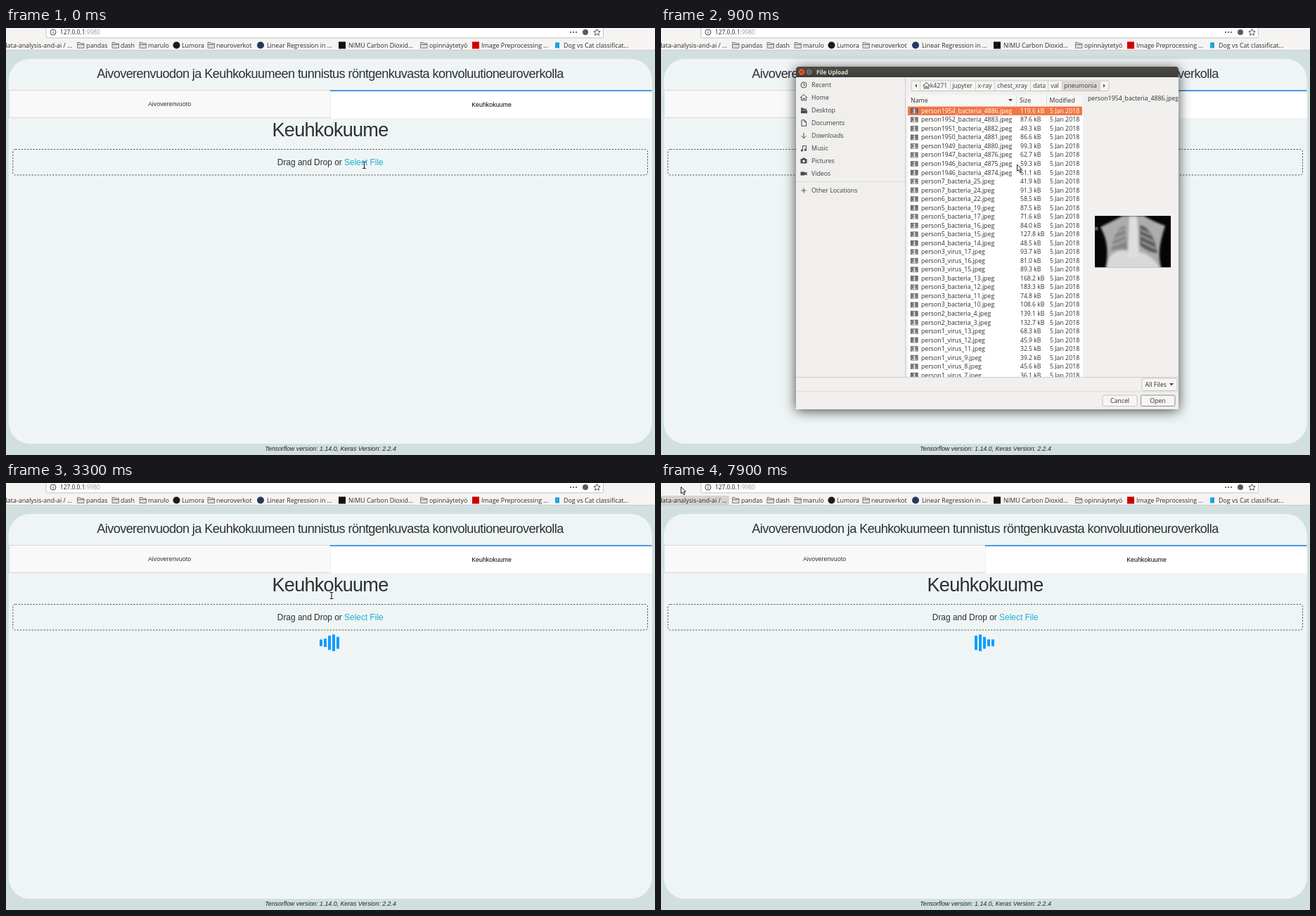
Recreate the animation shown at these times as an HTML page. Size 923 px wide and 607 px high, loop 8 s.

```html
<!DOCTYPE html>
<html lang="fi">
<head>
<meta charset="utf-8">
<title>Keuhkokuume</title>
<style>
html, body { margin: 0; width: 100%; height: 100%; overflow: hidden; background: #d1e0df; }
svg { display: block; width: 100vw; height: 100vh; }
text { font-family: "Open Sans", "Noto Sans", sans-serif; white-space: pre; }
.page text { font-family: "Liberation Sans", Arial, sans-serif; }
.mid { text-anchor: middle; }
.end { text-anchor: end; }
.line { fill: none; stroke: #4a4a4a; stroke-width: 1; }
.btn { fill: #f6f5f4; stroke: #bcb9b5; stroke-width: .8; }
.shadow { filter: drop-shadow(0 2px 9px rgba(0,0,0,.72)); }
</style>
</head>
<body>
<svg id="stage" viewBox="0 0 923 607"></svg>
<script>
const LOOP = 8000;
const INK = '#2e2e2e';
const rect = (x, y, w, h, fill, more = '') =>
  `<rect x="${x}" y="${y}" width="${w}" height="${h}" fill="${fill}" ${more}/>`;
const box = (x, y, w, h, cls, r = 2) =>
  `<rect class="${cls}" x="${x}" y="${y}" width="${w}" height="${h}" rx="${r}"/>`;
const disc = (x, y, r, fill) => `<circle cx="${x}" cy="${y}" r="${r}" fill="${fill}"/>`;
const path = (d, more = 'class="line"') => `<path d="${d}" ${more}/>`;
const text = (x, y, s, size = 8.8, fill = INK, more = '') =>
  `<text x="${x}" y="${y}" font-size="${size}" fill="${fill}" ${more}>${s}</text>`;
const mid = 'class="mid"';

// Browser bar
const folder = x => path(`M${x} 20.5h3.5l1 1.5h5v6.5h-9.5zM${x} 23.5h9.5`, 'fill="#dedcda" stroke="#77736f" stroke-width=".9"');
const marks = [[114, 'pandas'], [163, 'dash'], [202, 'marulo'], [250, 'Lumora'], [299, 'neuroverkot'],
  [371, 'Linear Regression in …'], [487, 'NIMU Carbon Dioxid…'], [602, 'opinnäytetyö'],
  [676, 'Image Preprocessing …'], [793, 'Dog vs Cat classificat…']];
const browser = rect(0, 0, 923, 32, '#f5f4f2') + rect(0, 31, 923, 1, '#cfccc9') +
  rect(57, -10, 792.5, 24, '#fff', 'rx="2.5" stroke="#c4c1be"') +
  `<circle class="line" cx="67" cy="6" r="4" stroke-width=".8"/>` + path('M67 5.5v2.8M67 3.6v1') +
  text(77, 9.2, '127.0.0.1<tspan fill="#999">:9980</tspan>', 8.4, '#222') +
  [803, 807, 811].map(x => disc(x, 6, 1.1, '#4a4a4a')).join('') + disc(824, 6, 4, '#5a5a5a') +
  path('M840.5 1.5l1.4 3 3.2.4-2.4 2.2.7 3.2-2.9-1.6-2.9 1.6.7-3.2-2.4-2.2 3.2-.4z') +
  rect(-4, 18, 101, 13, '#d6d3d0', 'id="hover" rx="2"') +
  text(94, 27.5, 'data-analysis-and-ai / …', 8.9, INK, 'class="end"') +
  [101.5, 151, 190, 287, 589.5].map(folder).join('') +
  marks.map(([x, s]) => text(x, 27.5, s, 8.9)).join('') +
  disc(242.5, 24.5, 5, '#1b1b1b') + disc(362, 24.5, 5, '#24385e') +
  rect(473, 19.5, 10, 10, '#111') + rect(663, 19.5, 10, 10, '#d00000') + rect(781, 20.5, 6, 8, '#1fa2dc');

// Web page
const page = `<g class="page">` + rect(3.8, 44, 915, 547, '#eff5f5', 'rx="30.2"') +
  text(461, 71, 'Aivoverenvuodon ja Keuhkokuumeen tunnistus röntgenkuvasta konvoluutioneuroverkolla', 18.15, '#2d3030', mid + ' letter-spacing="-.605"') +
  rect(4.5, 88.5, 457, 39, '#f9f9f9', 'stroke="#d3d5d5" stroke-width=".9"') +
  rect(461.5, 88.5, 457, 39.5, '#fff') + rect(461, 88.3, 457.5, 1.6, '#2380dc') +
  text(232.5, 111, 'Aivoverenvuoto', 8.9, '#333', mid) +
  text(690.5, 111.5, 'Keuhkokuume', 8.9, '#000', mid) +
  text(461, 153.5, 'Keuhkokuume', 27.1, '#2d3030', mid + ' letter-spacing="-.753"') +
  rect(9.8, 172.5, 902.7, 36.5, 'none', 'rx="3.5" stroke="#444" stroke-width=".9" stroke-dasharray="2.3 1.9"') +
  text(385.8, 195, 'Drag and Drop or <tspan id="link" fill="#1eaedb">Select File</tspan>', 11.92, '#2d3030') +
  text(461.5, 601, 'Tensorflow version: 1.14.0, Keras Version: 2.2.4', 8.8, '#222', mid + ' font-style="italic"') +
  `<g id="bars">` + [0, 1, 2, 3, 4].map(i => rect(446 + 6 * i, 215.2, 4, 24, '#119dff')).join('') + `</g></g>`;

// File dialog
const ROW = 12.53;
const rowY = i => 111.6 + ROW * i;
const files = ('1954b4886 119.6,1952b4883 87.6,1951b4882 49.3,1950b4881 86.6,1949b4880 99.3,1947b4876 62.7,' +
  '1946b4875 59.3,1946b4874 61.1,7b25 41.9,7b24 91.3,6b22 58.5,5b19 87.5,5b17 71.6,5b16 84.0,5b15 127.8,' +
  '4b14 48.5,3v17 93.7,3v16 81.0,3v15 89.3,3b13 168.2,3b12 183.3,3b11 74.8,3b10 108.6,2b4 139.1,2b3 132.7,' +
  '1v13 68.3,1v12 45.9,1v11 32.5,1v9 39.2,1v8 45.6,1v7 36.1').split(',').map(s => {
  const [id, size] = s.split(' ');
  return ['person' + id.replace('b', '_bacteria_').replace('v', '_virus_') + '.jpeg', size + ' kB'];
});
const thumb = i => {
  const y = rowY(i) + 2.5, g = 130 + i * 37 % 50;
  return rect(355, y, 10.5, 7.5, '#4a4a4a') + rect(356, y + 1, 8.5, 6.5, `rgb(${g},${g},${g})`) +
    rect(359.4, y + .5, 1.8, 7, '#ddd') + rect(357, y + 2, 2, 3, '#6a6a6a') + rect(361.8, y + 2, 2, 3, '#6a6a6a');
};
const row = ([name, size], i) => {
  const y = rowY(i) + 9.2;
  return `<g class="row">` + text(370, y, name, 8.75, 'inherit') +
    text(511, y, size, 8.6, 'inherit') + text(553, y, '5 Jan 2018', 8.75, 'inherit') + `</g>`;
};
const places = [[81, 'Recent'], [99, 'Home'], [117, 'Desktop'], [135, 'Documents'], [153, 'Downloads'],
  [171, 'Music'], [189, 'Pictures'], [207, 'Videos'], [231, 'Other Locations']];
const home = (x, y) => path(`M${x - 5} ${y}l5-4.5 5 4.5M${x - 3.3} ${y - 1}v5h2.3v-3h2v3h2.3v-5`);
const icons = `<circle class="line" cx="203" cy="81" r="4"/>` + path('M203 78.5v2.8h2') + home(203, 99) +
  path('M199 113.5h3l1 1.2h4v2h-8zM199 117.3h9v4h-9z', 'fill="#4a4a4a"') +
  path('M200 130.8h4l2.5 2.5v6h-6.5zM204 131v2.5h2.5') + path('M203 149v7.5M199.5 153.2l3.5 3.5 3.5-3.5') +
  path('M201.5 174v-6.5h5v5.5') + disc(200.4, 174, 1.6, '#4a4a4a') + disc(205.4, 173.2, 1.6, '#4a4a4a') +
  rect(198.5, 186, 9, 6.5, '#4a4a4a', 'rx="1"') + rect(201, 184.7, 4, 2, '#4a4a4a') + disc(203, 189.2, 1.8, '#f0efee') +
  path('M198.5 204.5h6v1.5l3-1.5v5l-3-1.5v1.5h-6z', 'fill="#4a4a4a"') + path('M203 227.5v7M199.5 231h7');
const crumbs = [[395, 'k4271'], [428.5, 'jupyter'], [460.5, 'x-ray'], [499.5, 'chest_xray'], [538, 'data'], [560, 'val'], [596.5, 'pneumonia']];
const tri = (x, y) => path(`M${x - 3} ${y - 1.5}h6l-3 3.5z`, 'fill="#444"');

// Soft chest pictures: pale torso, grey lungs, bright spine and belly
const chest = (id, y, h, torso, lungs, belly, ribs, r) => `<g id="${id}"><svg x="617" y="${y}" width="108" height="${h}" viewBox="0 0 108 74" preserveAspectRatio="none">` +
  rect(0, 0, 108, 74, '#050505') + `<g filter="url(#soft)">` +
  path(torso, 'fill="#acacac"') + lungs + path(belly, 'fill="#d8d8d8"') + path('M49 0h11l3 60H47z', 'fill="#dedede"') +
  path(ribs, 'stroke="#b4b4b4" stroke-width="1.6" fill="none"') +
  `</g>` + text(0, r + 13, 'R', r, '#ccc') + `</svg></g>`;
const scans =
  chest('scanA', 267, 73.5, 'M15 76C20 52 18 34 8 16Q24 8 40 0H70Q82 8 100 14C94 34 88 52 95 76z',
    path('M43 14C31 16 25 32 23 50Q36 46 46 48z', 'fill="#868686"') + path('M64 13C76 14 86 32 89 54Q74 52 64 42z', 'fill="#5a5a5a"'),
    'M17 76C19 54 28 49 46 50S80 52 93 76z',
    'M26 26l16-7M24 35l20-8M24 43l20-8M65 20l15 7M65 28l19 9M66 37l21 10', 8) +
  chest('scanB', 266.5, 74.5, 'M10 76C15 56 13 38 2 34V14Q24 8 40 0H70Q84 6 106 12V32C96 40 95 56 101 76z',
    path('M45 11C28 12 18 34 15 60Q32 54 46 57z', 'fill="#6c6c6c"') + path('M64 11C82 12 92 34 97 64Q82 58 65 55z', 'fill="#6c6c6c"'),
    'M12 76Q16 63 44 58T99 76z',
    'M24 23l20-8M20 33l25-10M18 43l27-11M17 53l28-12M65 15l20 9M65 23l25 11M65 32l28 12M66 41l29 13', 11);

const dialog = `<g id="dialog">` + rect(192, 56, 544, 486, '#f1f0ef', 'class="shadow"') +
  path('M192 70V59q0-4 4-4H732q4 0 4 4V70z', 'fill="url(#bar)"') +
  disc(200, 62.5, 4.2, '#ea5a2c') + path('M198.5 61l3 3M201.5 61l-3 3', 'stroke="#5b2412"') +
  disc(210.5, 62.5, 4, '#75736c') + `<circle class="line" cx="210.5" cy="62.5" r="1.5"/>` +
  text(221, 66, 'File Upload', 8.1, '#e2ded5', 'font-weight="700"') +
  rect(192, 70, 155, 426, '#f0efee') + rect(347, 70, 1, 426, '#d0cecc') + rect(192, 218, 155, 1, '#dcdad8') +
  icons + places.map(([y, s]) => text(214, y + 3.2, s, 8.8, '#3c3c3c')).join('') +
  box(356, 75, 281, 14.5, 'btn') + rect(570, 75.4, 54, 13.7, '#dbd8d6') +
  [368, 411, 447, 474, 525, 550, 570, 624].map(x => rect(x, 75.4, .8, 13.7, '#c6c3c0')).join('') +
  path('M364 79.5v5l-3-2.5zM629 79.5v5l3-2.5z', 'fill="#555"') + home(377.5, 82) +
  crumbs.map(([x, s]) => text(x, 85.3, s, 8.75, '#3c3c3c', mid)).join('') +
  rect(351, 95, 249, 401, '#fff') + rect(351, 95, 249, 16, '#f7f6f5') +
  rect(505, 96, .8, 14, '#d8d6d4') + rect(548, 96, .8, 14, '#d8d6d4') +
  text(355, 106, 'Name') + text(510, 106, 'Size') + text(552.5, 106, 'Modified') + tri(497, 102.5) +
  `<g clip-path="url(#list)">` + rect(351, 0, 248, ROW, '#f07746', 'id="pick"') +
  thumb(0) + `<g id="thumbs">` + files.slice(1).map((f, i) => thumb(i + 1)).join('') + `</g>` +
  files.map(row).join('') + rect(597.8, 111, 2, 347, '#f07746', 'id="scroll"') + `</g>` +
  `<g clip-path="url(#side)">` + text(607, 103, '', 8.75, INK, 'id="name"') + `</g>` + scans +
  rect(192, 496, 544, 1, '#cfcdca') + rect(192, 516.5, 544, 1, '#dddbd9') +
  box(684, 498, 50, 17.5, 'btn') + text(688.5, 510, 'All Files') + tri(726, 506.5) +
  box(628, 522, 49, 15.5, 'btn') + text(652.5, 533, 'Cancel', 8.8, INK, mid) +
  rect(682.5, 522, 48.5, 15.5, '#f6f5f4', 'rx="2" stroke="#8f8c88"') + text(706.5, 533, 'Open', 8.8, INK, mid) + `</g>`;

const pointers = `<g id="arrow">` +
  path('M.5.5V10l2.2-2 1.6 3.8 1.7-.8-1.6-3.6H7.2z', 'fill="#fff" stroke="#222" stroke-width="1" stroke-linejoin="round"') + `</g><g id="beam">` +
  [['#fff', 2.4], ['#222', 1.2]].map(([color, w]) =>
    path('M-2.5-4.5H2.5M0-4.5V4.5M-2.5 4.5H2.5', `fill="none" stroke="${color}" stroke-width="${w}"`)).join('') + `</g>`;

const $ = id => document.getElementById(id);
$('stage').innerHTML = `<defs><linearGradient id="bar" x2="0" y2="1"><stop stop-color="#4d4b45"/><stop offset="1" stop-color="#3e3d39"/></linearGradient>` +
  `<clipPath id="list">${rect(351, 111, 249, 385, '#000')}</clipPath><clipPath id="side">${rect(600, 95, 135.5, 20, '#000')}</clipPath>` +
  `<filter id="soft"><feGaussianBlur stdDeviation="1.4"/></filter></defs>` +
  rect(0, 0, 923, 607, '#d1e0df') + page + browser + dialog + pointers;

// The screen refreshes only at these moments
const ticks = [0, 100, 300, 400, 500, 700, 800, 900, 1600, 1700, 1800, 1900, 2400, 3300, 3500, 3700, 3900, 4100,
  4300, 5200, 5400, 6000, 6100, 6600, 6800, 6900, 7100, 7200, 7400, 7600, 7800, 7900];
const moves = [[0, 'beam', 509.5, 195], [100, 'beam', 509.8, 195.6], [700, 'arrow', 506, 193.5],
  [1600, 'arrow', 495, 185], [1700, 'arrow', 484, 176], [1800, 'arrow', 472, 167], [1900, 'arrow', 461, 158],
  [3300, 'beam', 463, 160], [3900, 'arrow', 44, 347.5], [4100, ''],
  [7600, 'arrow', 53, 57], [7800, 'arrow', 36, 21], [7900, 'arrow', 28, 5]];
const show = (id, on) => $(id).style.display = on ? '' : 'none';
const clamp = x => Math.max(0, Math.min(1, x));
const ease = x => x * x * (3 - 2 * x);

// Bars stretch from 0.4 to full and back, 100 ms apart, every 1200 ms
function stretch(t, i) {
  const p = (t - 2780 - 100 * i + 2400) % 1200 / 240;
  return .4 + .6 * ease(clamp(1 - Math.abs(p - 1)));
}

const bars = [...$('bars').children], rows = document.querySelectorAll('.row');

function draw(now) {
  const time = now % LOOP;
  const t = ticks.findLast(k => k <= time);

  const [, kind, x, y] = moves.findLast(m => m[0] <= t);
  for (const id of ['arrow', 'beam']) {
    show(id, id === kind);
    if (id === kind) $(id).setAttribute('transform', `translate(${x} ${y})`);
  }
  const hue = clamp((t - 200) / 300);
  $('link').setAttribute('fill', t < 3300 ? `rgb(${30 - 15 * hue},${174 - 14 * hue},${219 - 13 * hue})` : '#1eaedb');

  show('dialog', t >= 700 && t < 3300);
  $('dialog').setAttribute('opacity', t < 800 ? .5 : t < 900 ? .88 : 1);
  show('thumbs', t >= 900);
  $('scroll').setAttribute('opacity', clamp((t - 1500) / 400));
  const picked = t < 2400 ? 0 : 3;
  $('pick').setAttribute('y', rowY(picked));
  rows.forEach((r, i) => r.setAttribute('fill', i === picked ? '#fff' : INK));
  $('name').textContent = files[picked][0];
  show('scanA', !picked);
  show('scanB', picked);

  show('bars', t >= 3300);
  bars.forEach((b, i) => {
    const h = 24 * stretch(t, i);
    b.setAttribute('y', 227.2 - h / 2);
    b.setAttribute('height', h);
  });
  show('hover', t >= 7800);
}

const start = performance.now();
function loop() {
  draw(performance.now() - start);
  requestAnimationFrame(loop);
}
loop();
</script>
</body>
</html>
```
